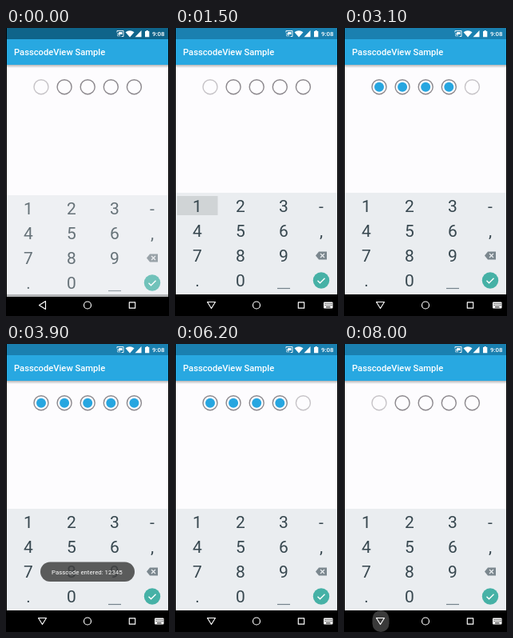
These frames come from a looping animation (204 by 360 pixels, 8.1 s). An HTML page:

```html
<!DOCTYPE html>
<html lang="en">
<head>
<meta charset="utf-8">
<title>Passcode entry</title>
<style>
  html, body { margin: 0; width: 100%; height: 100%; overflow: hidden; background: #000; }
  svg { display: block; width: 204px; height: 360px; }
  text { font-family: Roboto, "Open Sans", sans-serif; }
  .title { font-size: 11.2px; font-weight: 500; fill: #fff; }
  .clock { font-size: 7.85px; font-weight: 500; fill: #fff; }
  .toast { font-size: 7.85px; fill: #fff; }
  .key { font-size: 21px; fill: #37474f; text-anchor: middle; }
  .line { fill: none; stroke: #fff; stroke-width: 1.15; stroke-linejoin: round; }
</style>
</head>
<body>
<svg viewBox="0 0 204 360">
  <defs>
    <linearGradient id="shade" x2="0" y2="1">
      <stop offset="0" stop-color="#000" stop-opacity=".28"/>
      <stop offset="1" stop-color="#000" stop-opacity="0"/>
    </linearGradient>
    <clipPath id="screen"><path d="M1 0H203V360H1z"/></clipPath>
  </defs>
  <rect width="204" height="360"/>
  <g clip-path="url(#screen)">
    <rect width="204" height="333" fill="#fdfcfe"/>
    <rect y="46" width="204" height="4" fill="url(#shade)"/>
    <rect id="status" width="204" height="14"/>
    <rect y="14" width="204" height="32" fill="#28a8e1"/>
    <text class="title" x="10" y="34">PasscodeView Sample</text>

    <g fill="#fff">
      <path d="M139 5.500V3.500H147V10.500H144.500" fill="none" stroke="#fff" stroke-width=".9"/>
      <path d="M139 7a3.500 3.500 0 0 1 3.500 3.500M139 9a1.500 1.500 0 0 1 1.500 1.500" fill="none" stroke="#fff" stroke-width=".9"/>
      <rect x="141" y="5" width="4.500" height="3"/>
      <path d="M149.500 5.200Q155 1.200 160.500 5.200L155 11.500z"/>
      <path d="M169.500 3V11.300H161.500z"/>
      <path d="M174 4H175.500V3H177.800V4H179.300V11.300H174z"/>
    </g>
    <text class="clock" x="183" y="10">9:08</text>

    <g id="slots"></g>

    <g id="keyboard">
      <rect y="206" width="204" height="127" fill="#eaedf0"/>
      <rect id="press" height="24" fill="#d0d4d6"/>
      <g id="keys"></g>
      <path d="M128 325.500H144" stroke="#74818a" stroke-width="1.200"/>
      <path d="M176 284.500L180 279.500H190V289.500H180z" fill="#7b878e"/>
      <path d="M182 282l5 5m0-5l-5 5" stroke="#eaedf0" stroke-width="1.200"/>
      <circle cx="183" cy="315.500" r="10.200" fill="#46b1a6"/>
      <path d="M178.500 315.800l3 3 6-6" fill="none" stroke="#fff" stroke-width="1.400"/>
    </g>

    <g id="toast">
      <rect x="43" y="272.500" width="118" height="24.500" rx="12.200" fill="#404040" fill-opacity=".84"/>
      <text class="toast" x="57" y="287.500">Passcode entered: 12345</text>
    </g>

    <rect id="ripple" x="35.500" y="333" width="21" height="27" rx="10.500" fill="#3a3a3a"/>
    <path id="back" class="line"/>
    <circle class="line" cx="102" cy="346.500" r="4.500"/>
    <rect class="line" x="154.300" y="342.800" width="7.400" height="7.400"/>
    <g id="switcher">
      <rect x="186" y="342.500" width="11.500" height="8" rx="1" fill="#fff"/>
      <path d="M187.500 344.500H196.500M187.500 346.500H196.500" stroke="#000" stroke-dasharray="1 1"/>
      <path d="M189 348.800H194.500" stroke="#000"/>
    </g>
  </g>
</svg>
<script>
const LOOP = 8100, TICK = 100;
const COLS = [28, 82, 136, 183], ROWS = [222.5, 253.5, 284.5, 315.5];
const $ = id => document.getElementById(id);

function add(parent, tag, attrs, text = '') {
  const el = document.createElementNS('http://www.w3.org/2000/svg', tag);
  for (const k in attrs) el.setAttribute(k, attrs[k]);
  el.textContent = text;
  return parent.appendChild(el);
}

['123-', '456,', '789', '.0'].forEach((row, r) => [...row].forEach((ch, c) =>
  add($('keys'), 'text', { class: 'key', x: COLS[c], y: ROWS[r] + 7.5 }, ch)));

const slots = [0, 1, 2, 3, 4].map(i => {
  const at = { cx: 44 + 29.1 * i, cy: 73.7 };
  return {
    ring: add($('slots'), 'circle', { ...at, r: 9, fill: 'none', 'stroke-width': 1.4 }),
    dot: add($('slots'), 'circle', { ...at, r: 6, fill: '#27a6e0' })
  };
});

// [start, end, column, row]
const presses = [
  [1500, 1600, 0, 0], [1900, 2000, 1, 0], [2100, 2200, 2, 0],
  [2800, 2900, 0, 1], [3400, 3500, 1, 1],
  [6100, 6200, 3, 2], [6300, 6400, 3, 2], [6500, 6600, 3, 2],
  [6800, 7000, 3, 2], [7100, 7200, 3, 2]
];

const ramp = (t, a, b) => Math.min(1, Math.max(0, (t - a) / (b - a)));
const mix = (a, b, u) => `rgb(${a.map((v, i) => Math.round(v + (b[i] - v) * u))})`;

// Digits land on key release, deletions on key press
function countAt(t) {
  return presses.reduce((n, [down, up, col]) =>
    col === 3 ? n - (t >= down) : n + (t >= up), 0);
}

function keyboardAt(t) {
  if (t < 1000) {
    const u = ramp(t, -100, 200);
    return { y: 27 * u * u, alpha: 1 - u ** 1.3 };
  }
  const left = 1 - ramp(t, 900, 1300);
  return { y: 83 * left ** 3, alpha: 1 - 1.28 * left ** 3 };
}

function draw(t) {
  $('status').setAttribute('fill', mix([15, 100, 138], [26, 128, 176], ramp(t, 0, 900)));

  const count = countAt(t);
  slots.forEach(({ ring, dot }, i) => {
    ring.setAttribute('stroke', i === count ? '#c6c3c7' : '#8c888d');
    dot.setAttribute('opacity', i < count ? 1 : 0);
  });

  const { y, alpha } = keyboardAt(t);
  $('keyboard').setAttribute('transform', `translate(0 ${y})`);
  $('keyboard').setAttribute('opacity', alpha);

  const hit = presses.find(([down, up]) => t >= down && t < up);
  $('press').setAttribute('opacity', hit ? 1 : 0);
  if (hit) {
    const width = hit[2] === 3 ? 37 : 51;
    $('press').setAttribute('x', COLS[hit[2]] - width / 2);
    $('press').setAttribute('y', ROWS[hit[3]] - 12.5);
    $('press').setAttribute('width', width);
  }

  $('toast').setAttribute('opacity', ramp(t, 3400, 3900) * (1 - ramp(t, 5100, 6000) ** 1.6));

  const open = t >= 1000;
  $('back').setAttribute('d', open ? 'M40.500 342.500H50.500L45.500 350.500z' : 'M49.500 341.500V351.500L41.500 346.500z');
  $('switcher').setAttribute('opacity', open ? 1 : 0);
  $('ripple').setAttribute('opacity', t >= 8000 ? 1 : 0);
}

let start;
function frame(now) {
  start ??= now;
  draw(Math.floor((now - start) % LOOP / TICK) * TICK);
  requestAnimationFrame(frame);
}
draw(0);
requestAnimationFrame(frame);
</script>
</body>
</html>
```
